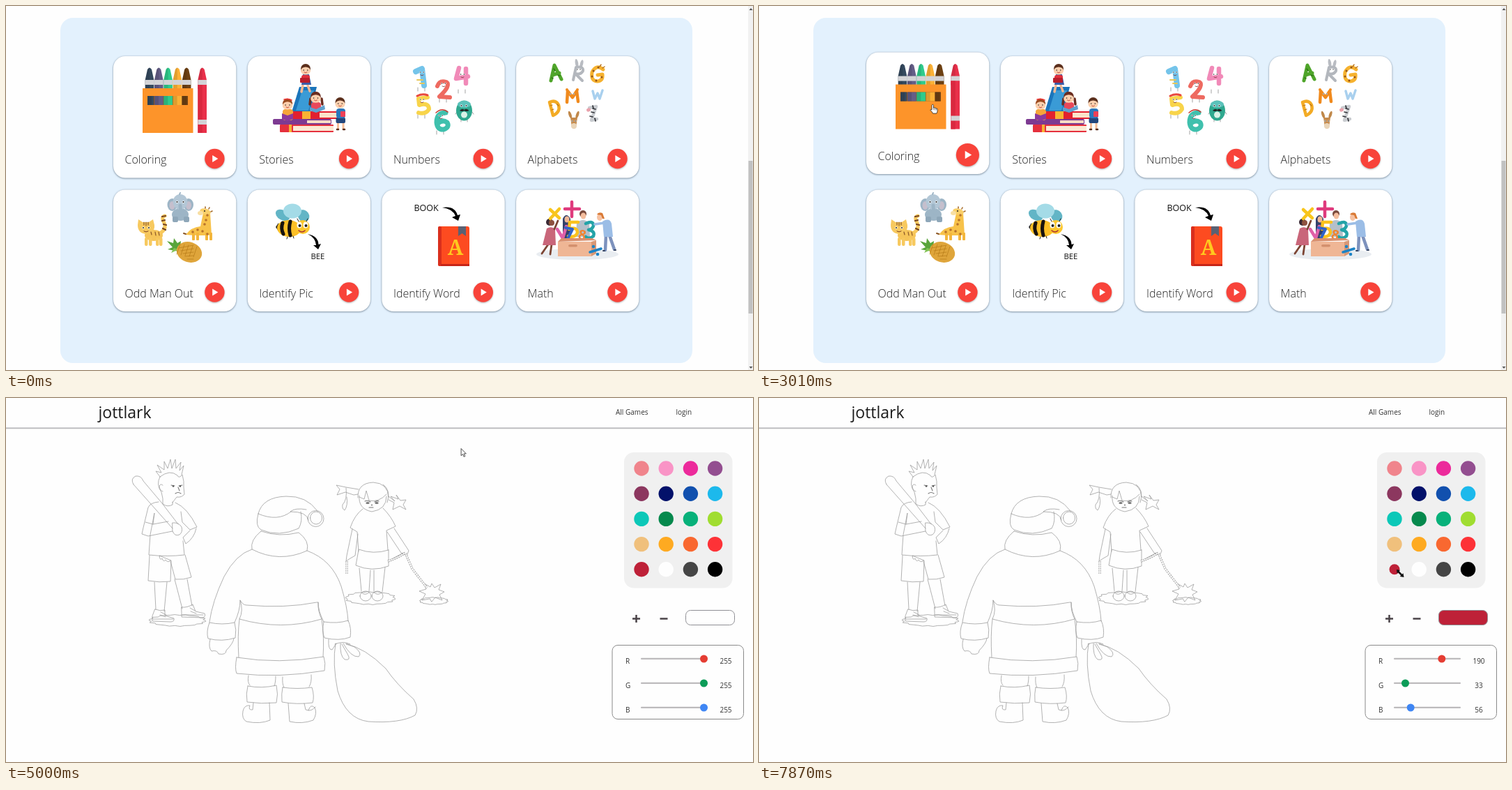
Recreate the animation shown at these times as an HTML page. Size 1072x522 px, loop 8 s.

```html
<!DOCTYPE html>
<html lang="en">
<head>
<meta charset="utf-8">
<title>Kids games</title>
<style>
html, body { margin: 0; width: 100%; height: 100%; overflow: hidden; background: #fefefe; }
svg { display: block; width: 1072px; height: 522px; }
text { font-family: "Open Sans", "Noto Sans", sans-serif; fill: #333; white-space: pre; }
.label { font-size: 16px; font-weight: 300; fill: #222; }
.card { filter: drop-shadow(0 1px .8px rgba(40, 60, 80, .4)) drop-shadow(0 0 1px rgba(40, 60, 80, .25)); }
.btn { filter: drop-shadow(0 1px 1px rgba(0, 0, 0, .3)); }
.b { font-weight: 700; text-anchor: middle; }
.ink { fill: none; stroke: #999; stroke-width: .75; stroke-linejoin: round; stroke-linecap: round; }
</style>
</head>
<body>
<svg id="stage" viewBox="0 0 1072 522" xmlns="http://www.w3.org/2000/svg"></svg>
<script>
const P = (d, fill, more = '') => `<path d="${d}" fill="${fill}" ${more}/>`;
const L = (d, color, w = 1) =>
  P(d, 'none', `stroke="${color}" stroke-width="${w}" stroke-linecap="round" stroke-linejoin="round"`);
const C = (x, y, r, fill, more = '') => `<circle cx="${x}" cy="${y}" r="${r}" fill="${fill}" ${more}/>`;
const E = (x, y, rx, ry, fill, turn = 0) =>
  `<ellipse cx="${x}" cy="${y}" rx="${rx}" ry="${ry}" fill="${fill}" transform="rotate(${turn} ${x} ${y})"/>`;
const R = (x, y, w, h, fill, r = 0, more = '') =>
  `<rect x="${x}" y="${y}" width="${w}" height="${h}" rx="${r}" fill="${fill}" ${more}/>`;
const T = (x, y, size, s, more = '') => `<text x="${x}" y="${y}" font-size="${size}" ${more}>${s}</text>`;
const G = (more, body) => `<g ${more}>${body}</g>`;
const each = (list, fn) => list.map(fn).join('');

// Bold glyph centred on x, y
const glyph = (s, x, y, size, color, turn = 0) =>
  T(x, y + size * .36, size, s, `class="b" style="fill:${color}" transform="rotate(${turn} ${x} ${y})"`);
const eyes = (x, y, gap, r) => each([-gap, gap], d => C(x + d, y, r * 1.7, '#fff') + C(x + d, y, r, '#222'));
const face = (x, y, r, hair, skin = '#fcd0ae') =>
  C(x, y - 2, r, hair) + E(x, y + 1, r, r * .8, skin) +
  C(x - r * .4, y, .8, '#222') + C(x + r * .4, y, .8, '#222') +
  L(`M${x - 2} ${y + 3}q2 2 4 0`, '#c0392b', .9);

function crayons() {
  const colors = ['#34495e', '#645d87', '#2fcb8c', '#fbb136', '#6d4013'];
  const stick = (x, c) => P(`M${x - 6.3} 106L${x - 3} 91Q${x} 86 ${x + 3} 91L${x + 6.3} 106V119H${x - 6.3}Z`, c) +
    P(`M${x - 6.3} 106L${x - 3} 91Q${x - 2} 88 ${x} 88V119H${x - 6.3}Z`, 'rgba(0,0,0,.1)') +
    R(x - 6.3, 106, 12.6, 7, '#d3d3d6');
  const xs = i => 206 + i * 13.3;
  return each(colors, (c, i) => stick(xs(i), c)) +
    R(196, 118, 72.5, 64, '#fd942a') + R(203, 129, 57.5, 13, '#8a5420') +
    each(colors, (c, i) => R(xs(i) - (i ? 6.3 : 3), 129, i == 4 ? 8 : i ? 12.6 : 9, 13, c) +
      R(xs(i) - (i ? 6.3 : 3), 129, 6, 13, 'rgba(0,0,0,.12)')) +
    stick(281.7, '#e9304a') + R(275.4, 113, 12.6, 69, '#e9304a') + R(275.4, 113, 6.3, 69, '#d9283f') +
    R(275.4, 163, 12.6, 7, '#d3d3d6');
}

function stories() {
  return P('M410 152L421 116H446L437 152Z', '#1b75bb') + P('M416 150L425 121H442L434 150Z', '#3a9bd6') +
    R(393, 170, 77, 11, '#e5303d', 1) + R(412, 172, 58, 7, '#fbe9d4') + R(406, 170, 4, 11, '#f9b233') +
    R(383, 162, 84, 8, '#7d3a92', 2) + R(432, 164, 34, 4, '#f6dcc5') +
    R(408, 151, 75, 11, '#e2202f', 2) + R(425, 151, 12, 11, '#f9b233') + R(450, 153, 32, 7, '#fbe5ca') +
    L('M426 114l-2 9M433 114l3 8', '#f3b894', 3.5) + P('M424 113L426 98H435L438 113Z', '#3c5da8') +
    R(424, 99, 12, 9, '#e2303c', 3) + R(422, 103, 14, 7, '#b81f2d', 1) + face(430, 92, 7, '#5b2f1c') +
    R(397, 148, 15, 16, '#f6a539', 4) + P('M396 154l8 3 8-3v8l-8 3-8-3Z', '#8c3a9c') +
    face(404, 142, 7.2, '#9b4a1f') + L('M399 134q6-2 11 1', '#e33', 1.5) +
    L('M437 133l-1 8M453 133l1 8', '#6a2d20', 3.5) + R(438, 138, 14, 13, '#e9485a', 4) +
    P('M436 145l9 3 12-6 1 6-13 5-9-3Z', '#5fa0cf') + face(444.5, 132, 7.3, '#6a2d20') +
    L('M476.5 167v9M484 167v9', '#f5bd98', 3) + R(473.5, 160, 13.5, 8, '#24477c', 2) +
    R(474, 147, 13, 14, '#2b78bd', 4) + R(480, 151, 7, 8, '#ee4057', 1) +
    L('M475 177h2M484 177h2', '#5b2f1c', 2.5) + face(479.5, 140, 7, '#5b2f1c');
}

function numbers() {
  const digits = [['M588 94L597 90 600 114', '#74c4ea', 8, 597, 95], ['M650 89L646 104 663 101M660 90L660 111', '#f18ab8', 6.5, 655, 98],
    ['M619 115Q622 106 632 109Q639 114 622 130L637 131', '#ee6a60', 6, 628, 111],
    ['M605 131L592 133 593 142Q607 138 607 148Q602 156 592 153', '#f8d44a', 6, 597, 134],
    ['M631 153Q618 153 618 167Q619 178 628 177Q637 174 633 167Q626 162 619 169', '#3fc0ad', 7, 624, 157]];
  return each(digits, ([d, c, w, x, y]) => L(`M${x - 6} ${y + 22}v5M${x + 4} ${y + 22}v5`, '#666', .6) +
      L(d, c, w) + eyes(x, y, 2.4, .8) + L(`M${x - 2} ${y + 4}q2 1.5 4 0`, '#7a2f35', .8)) +
    L('M590 106h8M594 111h6', '#e8c75a', 2) + L('M590 129q8-4 15-1', '#e8483e', 3) + L('M617 153q9-8 17-1', '#c8392f', 1.5) +
    L('M653 163v3M662 163v3M647 152l-2 3M669 152l2 3', '#666', .6) +
    E(657.5, 150, 11.5, 14.5, '#2fa88f') + E(657.5, 141, 9.5, 5, '#5cc2bb') + E(657.5, 156, 4.5, 4.5, '#d9f2e7') +
    eyes(657, 143, 3.5, 1) + P('M651 150q4-4 6.5-1q3-3 7 1q-4 2-7 0q-3 2-6.500 0Z', '#222');
}

function alphabets() {
  const yellow = '#f6b22f';
  return L('M782 107L787 85 797 105M784 99L794 96', '#4fa52a', 5) + L('M786 90l2 3M783 103l2 1M792 99l3 1', '#276b12', 1.3) +
    E(819, 82, 2.2, 6, '#b9bcc2', -10) + E(826, 83, 2.2, 6, '#b9bcc2', 14) +
    L('M814 106L818 88Q829 86 828 93Q825 99 817 97L827 107', '#b3b7bd', 4) + eyes(822, 91, 2, .7) +
    L('M857 91Q847 83 841 95Q839 108 849 108Q857 107 856 98L849 99', yellow, 5) +
    each([[850, 88], [843, 93], [841, 101], [847, 107], [855, 102]], ([x, y]) => C(x, y, 1.5, '#94551b')) +
    L('M852 87l2-3M856 89l3-2', '#b8731f', 1.5) +
    L('M780 138L785 157Q796 152 793 142Q789 134 780 138', '#f3ab25', 4.5) + L('M781 143l3-1M783 149l3-1M791 141l2 2', '#b97516', 1.2) +
    L('M805 138L806 122 813 131 819 122 821 137', '#f08a1d', 4.5) + C(805, 120, 2, '#f08a1d') + C(820, 120, 2, '#f08a1d') +
    eyes(812.5, 126, 2.4, .7) + L('M842 122L845 133 849 125 852 133 856 121', '#a9d0ee', 3.5) +
    E(809.500, 156, 2, 5.500, '#c0884a', -20) + E(820, 156, 2, 5.500, '#c0884a', 20) + P('M810 160h10l-2 14q-3 4-6 0Z', '#c58a4c') +
    E(815, 172, 4, 4, '#ead5b9') + eyes(815, 165, 2.4, .7) +
    L('M837 146L847 144 840 164 848 162', '#c9ccd0', 4.500) + L('M842 143l1 4M846 148l-4-1M844 153l-4-1M842 159l-4-1M845 161l1 4', '#33353a', 1.700) +
    E(836, 149, 3, 2.500, '#e9a1ac', -20);
}

function oddOne() {
  const blue = '#9db5c6', fur = '#f7c95f', coat = '#f7c24a';
  const spots = [[287, 307], [285, 313], [275, 321], [282, 323], [268, 324], [289, 300], [289, 327]];
  return E(250, 299, 12, 9, blue) + E(238.5, 285, 7, 9, blue) + E(262, 285, 7, 9, blue) +
    E(238.5, 286, 4, 6, '#c5bfcd') + E(262, 286, 4, 6, '#c5bfcd') + E(250, 281, 10.5, 11, '#b3c7d6') +
    L('M250 286q0 8 3 11', blue, 5) + eyes(250, 281, 4.5, 1.1) + L('M249 270l1-2', blue, 2) +
    R(239, 302, 8, 8, '#8ea7b9', 2) + R(255, 302, 8, 8, '#8ea7b9', 2) +
    L('M221 326Q231 320 227 311Q222 302 228 301', fur, 5) + L('M224 302l5-1M224 308l4-1M226 313l4 1M225 319l4 2', '#754522', 2.2) +
    E(212, 329, 13, 8, '#f6c559') + each([201, 207, 217, 222], x => R(x - 2, 332, 4.5, 12, fur, 2)) +
    P('M189 314l1-8 6 4h9l6-4 2 8q1 12-12 13q-12-1-12-13Z', fur) +
    L('M198 310v4M201 310v5M204 310v4M214 324l1 5M219 324l1 5M208 324l1 4', '#8b5728', 1.200) + eyes(201, 318, 4, 1) +
    L('M198 323q3 2 6 0', '#7b3e22', 1) +
    P('M258 328Q266 317 279 316L283 297H293L295 328Q283 330 258 328Z', coat) +
    each([267, 273, 286, 292], x => R(x, 325, 4, 11, '#f3b63c', 1)) +
    E(286, 295, 8, 4.500, '#f9cf69', 15) + E(279, 297, 4, 3, '#f8dfa3') + L('M286 290v-2M291 291l1-2M294 295l2-1', '#a56b2b', 1.600) +
    C(285, 294, 1, '#222') + each(spots, ([x, y]) => C(x, y, 1.800, '#b8732c')) + L('M258 327l-3-1', '#895422', 2) +
    P('M248 352L232 349l7-3-8-9 9 3 1-7 5 7 5-3-1 9Z', '#58a53c') + P('M248 349L237 354l4-7Z', '#82c354') +
    E(263, 353, 18.500, 14.500, '#dfa53b', 18) +
    each([0, 1, 2, 3, 4], i => L(`M${250 + i * 6} ${341 + i}l-5 15M${248 + i * 3} ${347 + i * 4}l${21 - i * 3} -${4 - i}`, '#b67a18', .7));
}

function bee() {
  return E(397, 300, 11, 7, '#62b5c6', 30) + E(427, 301, 8, 9, '#62b5c6', -35) + E(411, 294, 13, 10.500, '#a4dbe7') +
    P('M387 317l4-6v12Z', '#222') + E(406, 319, 17, 12, '#fcbf26', 5) +
    L('M397 311q-3 8 1 16', '#17120f', 5) + L('M408 309q-3 10 0 20', '#17120f', 5) +
    C(426, 317, 10, '#fcc72d') + L('M420 309l-2-4M431 309l2-4', '#222', 1) +
    each([421, 430], x => E(x, 314, 3.500, 4.500, '#fff') + C(x + .5, 315, 2, '#222')) + L('M420 322q5 4 9 0', '#a33', 1.600) +
    L('M404 331l-1 3M412 330l1 3', '#222', 1) +
    P('M433 327Q448 330 448.500 342L452 341 448 349 441 343 445 343Q444 332 433 327Z', '#000') +
    T(437.500, 363, 11.300, 'BEE', 'style="fill:#111"');
}

function book() {
  return T(585.500, 294, 12.500, 'BOOK', 'style="fill:#111"') +
    P('M626 289Q644 286 648 300L652 299 649 308 640 303 645 301Q641 291 626 289Z', '#000') +
    R(620, 316, 45, 57, '#fd4b20', 3) + R(620, 316, 5, 57, '#d92f1d', 2) + R(624, 370, 41, 3, '#c72518') +
    P('M649 316h11v14l-5.500-4-5.500 4Z', '#5a6173') +
    T(645, 357, 30, 'A', 'text-anchor="middle" style="fill:#ffc81e;font-family:\'Noto Serif\',serif;font-weight:700"');
}

function math() {
  return E(820, 356, 59, 8, '#e9edf1') +
    L('M778 342l-9 13M783 342l-2 14', '#7c4534', 2.800) + P('M776 319q7-4 12 1l1 23h-19Z', '#c9667a') +
    L('M787 320l5-12', '#7c4534', 2.800) + C(780, 310, 5, '#3a2a35') + C(783, 311, 4, '#8e5240') +
    L('M781 292L794 304M794 291L781 305', '#f8c51c', 4.500) + L('M812 281V302M802 291H823', '#df3a7d', 4.500) +
    P('M819 311q9-8 18 0l1 20h-20Z', '#b5bfc9') + C(828, 298, 5, '#7a4a3c') + E(828.500, 301, 3.800, 4.500, '#f4bd9d') +
    P('M799 334V305q5-10 11 0v29Z', '#33416b') + E(805, 306, 3.500, 4.500, '#f0b796') +
    L('M791 320L799 333 804 316', '#e060a8', 4.500) +
    L('M821 310H809L808 320Q820 316 820 325Q817 333 807 330', '#fbc21d', 4.500) +
    L('M832 312Q843 307 843 315Q842 320 836 321Q846 323 843 330Q837 335 832 331', '#23a3a8', 4.500) +
    L('M803 318L813 320 806 334', '#3264c7', 4) + glyph('8', 827, 328, 19, '#f08430', 12) +
    P('M792 338l5-5h44l6 3Z', '#d9906e') + R(792, 338, 48, 21, '#efb695') + P('M840 338l7-2v19l-7 4Z', '#d99875') + R(807, 342, 13, 3.500, '#d3906e', 2) +
    L('M838 353l16-5', '#1d83c5', 3.500) + C(843, 345, 2.300, '#1d83c5') + C(849, 356, 2.300, '#1d83c5') +
    L('M861 329l-1 21M866 329l7 20', '#7d92bd', 4.500) + P('M856 309q10-6 13 3l2 19h-13Z', '#9bbde6') +
    L('M859 311l-14 2', '#9bbde6', 3.500) + E(852, 303, 4, 5, '#f6c2a2') + P('M848 299q2-4 8-2l3 8h-3l-2-5Z', '#d97a35') + L('M859 351h-2M873 350h2', '#33415e', 2);
}

const cards = [['Coloring', crayons], ['Stories', stories], ['Numbers', numbers], ['Alphabets', alphabets],
  ['Odd Man Out', oddOne], ['Identify Pic', bee], ['Identify Word', book], ['Math', math]];

function card([name, art], i) {
  const x = 154 + (i % 4) * 192.7, y = i < 4 ? 72 : 263.5;
  return G(`id="card${i}"`, R(x, y, 176.3, 174.5, '#fff', 17, 'class="card"') + art() +
    T(x + 16.5, y + 154, 16, name, 'class="label"') +
    G(`transform="translate(${x + 145.4} ${y + 147})"`,
      G(`id="btn${i}" class="btn"`, C(0, 0, 14.2, '#f8433a') + P('M-3.2 -5L5 0-3.2 5Z', '#fff'))));
}

const menu = R(78, 17, 907, 495, '#e3f1fd', 18) + each(cards, card) +
  R(1065, 0, 7, 522, '#f1f1f1') + R(1065.5, 222, 6, 219, '#c1c1c1') +
  P('M1066.5 6h5l-2.5-3ZM1066.5 517h5l-2.5 3Z', '#555');

// Ragged outline of a patch of ground
function patch(x, y, rx, ry) {
  const n = 34, pts = [];
  for (let i = 0; i < n; i++) {
    const a = i / n * 2 * Math.PI, k = 1 + .07 * Math.sin(i * 2.6);
    pts.push((x + rx * k * Math.cos(a)).toFixed(1) + ' ' + (y + ry * k * Math.sin(a)).toFixed(1));
  }
  return 'M' + pts.join('L') + 'Z';
}
const ring = (x, y, rx, ry = rx) => `M${x - rx} ${y}a${rx} ${ry} 0 1 0 ${2 * rx} 0a${rx} ${ry} 0 1 0 ${-2 * rx} 0Z`;

const boy = 'M221 113L215 105 223 107 217 96 227 103 227 91 232 101 236 88 238 101 243 88 244 101 251 92 249 104 255 97 252 110' +
  'M221 113Q235 102 246 111Q248 116 253 110Q256 120 255 128L256 138Q252 143 245 142Q241 147 239 150' +
  'M221 113Q215 124 223 135Q226 145 225 152Q232 157 239 153V149M225 125q-4-3-5 2q1 6 5 7' +
  'M183 124Q178 116 186 112Q194 111 197 119L224 151 247 181M183 124L215 160 239 187M239 179q9-1 13 6q2 7-3 11q-7 3-10-5Z' +
  'M219 149Q207 150 204 157L197 186 195 195 204 198 239 191M200 178L211 181 233 177M211 181L213 165 207 196 205 225Q232 228 256 225L254 205' +
  'M243 150Q260 157 274 185L264 189 253 178 251 163M273 187Q270 201 258 209L254 200 264 190' +
  'M206 226L204 262Q220 265 236 263L237 233 220 226q1 8 4 4q2 6 5 2q3 5 7 1M236 234L243 260Q255 261 266 257L257 225' +
  'M213 264L215 303M231 264L227 306M242 260L253 302M260 260L267 298' +
  'M214 303q7 3 14 1l0 8 13 4q1 5-5 5l-26-1 0-7ZM252 300q8 1 16-4l4 10 13 3q2 5-3 6l-30-1 0-6ZM211 317h29M253 311h30' +
  'M222 307l8 4M221 311l8 3M264 301l7 4M265 306l8 3' + patch(246, 319, 40, 8);

const santa = 'M362 166Q368 142 402 141Q431 140 447 162M434 175Q432 163 408 163Q415 157 431 160' + ring(444.5, 173, 11.5) + ring(445, 172, 8.5, 9) +
  'M362 166Q357 184 366 189Q392 200 420 187Q426 177 423 163M362 166Q390 178 409 163' +
  'M366 191Q350 204 353 217Q392 237 432 219Q436 205 420 193Q392 200 366 191' +
  'M353 217Q330 224 313 256Q296 292 292 321M432 219Q468 232 481 270Q490 300 491 320' +
  'M292 322Q287 335 290 345Q310 350 329 344Q331 332 328 322Q310 326 292 322M456 321Q453 335 457 344Q478 349 494 343Q496 330 491 319Q476 324 456 321' +
  'M328 322Q336 305 336 290Q340 297 345 297Q400 302 446 293L448 293Q448 306 456 321M336 290Q341 305 335 317Q395 334 453 317Q447 305 448 293' +
  'M335 317Q332 340 334 372M453 317Q457 345 455 371M331 372Q328 388 331 395Q392 402 457 391Q459 380 456 371Q392 382 331 372' +
  'M293 346Q290 358 295 363Q303 361 305 367Q316 369 316 362Q326 352 327 345M463 346Q462 362 468 361L474 352' +
  'M348 398Q346 408 350 412M387 399Q387 408 385 413M397 400Q396 410 399 415M438 397Q439 408 435 414' +
  'M347 413Q367 417 388 412Q391 425 388 437Q366 439 346 436Q344 424 347 413M397 415Q418 418 439 415Q443 428 440 437Q417 440 396 436Q395 424 397 415' +
  'M355 437L354 447Q347 448 350 441Q342 440 340 449Q338 460 345 464Q365 468 379 462L378 437' +
  'M405 438L407 464Q425 468 441 462Q447 452 443 444Q437 438 434 448L430 447 428 438M434 448q5 1 10-5';

const sack = 'M473 352Q468 380 476 420Q488 460 520 464Q565 467 587 455Q593 445 585 432Q560 410 545 388Q515 358 488 353' +
  'M472 353q12-5 22 0M480 352Q479 370 486 375Q496 377 490 367L482 353M484 352Q495 372 506 371Q512 366 500 357L488 352';

const girl = 'M505 143Q504 122 527 121Q548 122 549 142M507 140Q505 159 525 163Q546 160 546 141M507 142L514 145 517 133 521 147Q535 150 546 138' +
  'M541 124Q553 132 547 150M506 131L488 128 474 125 479 131 475 139 487 135 499 139 505 138M488 129Q490 146 483 153Q482 159 486 161Q491 154 489 142' +
  'M549 141L558 148 552 141 563 145 560 139 566 147 574 146 570 153 574 160 565 155 555 160 557 150 549 146' +
  'M512 159Q500 168 494 186L504 192 506 220M541 158Q553 170 559 184L546 190 548 218M506 217Q527 225 549 218M506 218L502 240Q525 250 549 241L549 218' +
  'M497 188L489 226 488 234 494 230 501 226 505 195M557 187L578 219 575 226 567 222 547 192M548 234L570 222' +
  'M507 244L510 277M523 247L521 277M528 247L528 277M544 243L540 278' + ring(516, 284, 8, 7) + ring(533, 284, 8, 7) +
  'M510 279q5 5 11 0M528 279q6 5 11 0M608 288L597 290 602 281 593 277 603 274 600 266 609 271 611 266 615 272 624 267 621 275 629 278 622 282 626 290 616 286 611 292Z' +
  patch(523, 287, 35, 9) + patch(614, 291, 20, 5);

const chain = 'M548 234Q565 228 573 222L583 245 604 272M489 234V252';
const drawing = P(boy + santa + sack + girl, 'none', 'class="ink"') +
  P(chain, 'none', 'stroke="#888" stroke-width="3" stroke-dasharray="2.2 1"') +
  P(chain, 'none', 'stroke="#fefefe" stroke-width="1.5"') +
  L('M237 125l5 1M248 126l5-1M243 137q4-3 8 0M247 128l2 5M515 148q4-2 8 1M529 149q4-2 6-1M521 157h6', '#777', 1.1) +
  each([240, 250], x => C(x, 126.5, 1.2, '#555')) + each([519, 532], x => E(x, 150.5, 2.7, 1.6, '#777')) + C(525, 153.5, 1, '#777');

const swatches = ['#f0848c', '#f994c6', '#ec2a9b', '#934e90', '#8c375f', '#03116a', '#1150ae', '#1cb9ec',
  '#0cc8b8', '#06894d', '#08b17a', '#a0dd31', '#f0c07c', '#feaa21', '#f96830', '#fd3237', '#be2138', '#fefefe', '#454545', '#000'];
const picked = 16;
const channels = [['R', 190, '#e53d33'], ['G', 33, '#0c9c58'], ['B', 56, '#3f86f4']];

const editor = R(0, 42.3, 1072, 1.7, '#bdbdbf') + R(0, 44, 1072, 1, '#eeeeee') +
  T(132.5, 29, 23, 'jottlark', 'style="fill:#1b1b1b"') +
  T(0, 24, 10, 'All Games', 'id="games"') + T(961.5, 24, 10, 'login', 'id="login"') + drawing +
  R(887, 78, 155.5, 194.5, '#f0f0f0', 14) +
  each(swatches, (c, i) => C(912 + (i % 4) * 35.2, 101 + Math.floor(i / 4) * 36.2, 10.7, c, `id="sw${i}"`)) +
  P('M899 316.5h11M904.5 311v11M938.5 316.5h11', 'none', 'stroke="#4a4348" stroke-width="2.5"') +
  R(975.5, 304.5, 70, 21, '#fefefe', 7, 'id="chosen" stroke="#8f8f94" stroke-width="1"') +
  R(870, 354.5, 188.5, 106, 'none', 8, 'stroke="#8a8a8a" stroke-width="1"') +
  each(channels, ([name, , c], i) => {
    const y = 374 + i * 35;
    return T(889, y + 7, 10, name) + R(911, y - 1.2, 96, 2.2, '#bdbbbd', 1) +
      C(1001.5, y, 5.5, c, `id="thumb${i}"`) + T(1033, y + 7, 10, 255, `id="value${i}" text-anchor="middle"`);
  });

const hand = G('transform="translate(0 .5) scale(.9)"',
  P('M-1.6 8V1.2Q-1.5 -.2 -.2 -.2Q1.1 -.2 1.1 1.2V5Q2.4 4.2 3.4 5.4Q5 4.8 5.6 6Q7.4 5.8 7.3 7.6V10Q7 12 6 14H0Q-1 11.5 -3.8 9Q-4.2 7.2 -1.6 8Z',
    '#fff', 'stroke="#222" stroke-width=".9"') + L('M1.2 5v3M3.4 6v2.4M5.5 6.5v2', '#222', .6));
const arrow = P('M0 0V10.2L2.4 8 4 11.8 5.7 11 4.1 7.4H7.2Z', '#fff', 'stroke="#222" stroke-width=".8"');
const resize = P('M0 0L5 1 3.6 2.3 8 6.7 9.5 5.3 10.5 11 4.7 10 6.2 8.6 1.8 4.2 .6 5.4Z', '#111');

const stage = document.getElementById('stage');
stage.innerHTML = R(0, 0, 1072, 522, '#fefefe') + G('id="menu"', menu) + G('id="editor"', editor) +
  G('id="status"', R(-1, 509, 357.5, 14, '#fff', 1, 'stroke="#d9d9dc" stroke-width="1"') +
    T(.5, 520, 8, 'Waiting for firestore.googleapis.com...', 'style="fill:#70757a"')) +
  G('id="cursor"', G('id="hand"', hand) + G('id="arrow"', arrow) + G('id="resize"', resize));

const $ = id => document.getElementById(id);
const show = (id, on) => $(id).setAttribute('visibility', on ? 'inherit' : 'hidden');
const ramp = (t, a, b) => Math.min(1, Math.max(0, (t - a) / (b - a)));
const ease = k => k * k * (3 - 2 * k);

// Pointer tip: time, x, y
const trail = [[370, 884, 426], [600, 693, 309], [829, 693, 309], [830, 348, 209], [1150, 249.5, 141], [4480, 249.5, 141],
  [4750, 430, 92], [5020, 670, 71], [5310, 839, 122], [5710, 839, 122], [6090, 875, 184], [6400, 889, 255],
  [6820, 889, 255], [7400, 915, 246]];

function pointer(t) {
  const i = trail.findIndex(p => p[0] > t);
  if (i < 0) return trail[trail.length - 1].slice(1);
  if (!i) return trail[0].slice(1);
  const [t0, x0, y0] = trail[i - 1], [t1, x1, y1] = trail[i];
  const k = (t - t0) / (t1 - t0);
  return [x0 + (x1 - x0) * k, y0 + (y1 - y0) * k];
}

function draw(t) {
  const inEditor = t >= 3980;
  show('menu', !inEditor);
  show('editor', inEditor);

  const lift = -5.5 * ease(ramp(t, 1060, 1380));
  $('card0').setAttribute('transform', `translate(0 ${lift})`);
  const beat = t < 1900 ? 1 : ramp((t - 1935) % 1010, 0, 310);
  $('btn0').setAttribute('transform', `scale(${1 + .27 * Math.sin(Math.PI * Math.max(0, beat))})`);

  $('status').setAttribute('opacity', ramp(t, 3600, 3820) * (1 - ramp(t, 4530, 4680)));

  const loaded = t >= 4150;
  $('games').setAttribute('x', loaded ? 875 : 919.5);
  show('login', inEditor && loaded);

  const chosen = t >= 7790;
  $('sw' + picked).setAttribute('r', 10.7 - 3.2 * ramp(t, 7690, 7860));
  $('chosen').setAttribute('fill', chosen ? swatches[picked] : '#fefefe');
  channels.forEach(([, value], i) => {
    const v = chosen ? value : 255;
    $('thumb' + i).setAttribute('cx', 916.5 + v / 3);
    $('value' + i).textContent = v;
  });

  const [x, y] = pointer(t);
  show('cursor', t >= 370);
  $('cursor').setAttribute('transform', `translate(${x} ${y})`);
  show('hand', t < 4500);
  show('arrow', t >= 4500 && t < 7250);
  show('resize', t >= 7250);
}

// 'inherit' keeps children of a hidden group hidden
const start = performance.now();
function tick() {
  draw((performance.now() - start) % 8000);
  requestAnimationFrame(tick);
}
tick();
</script>
</body>
</html>
```
